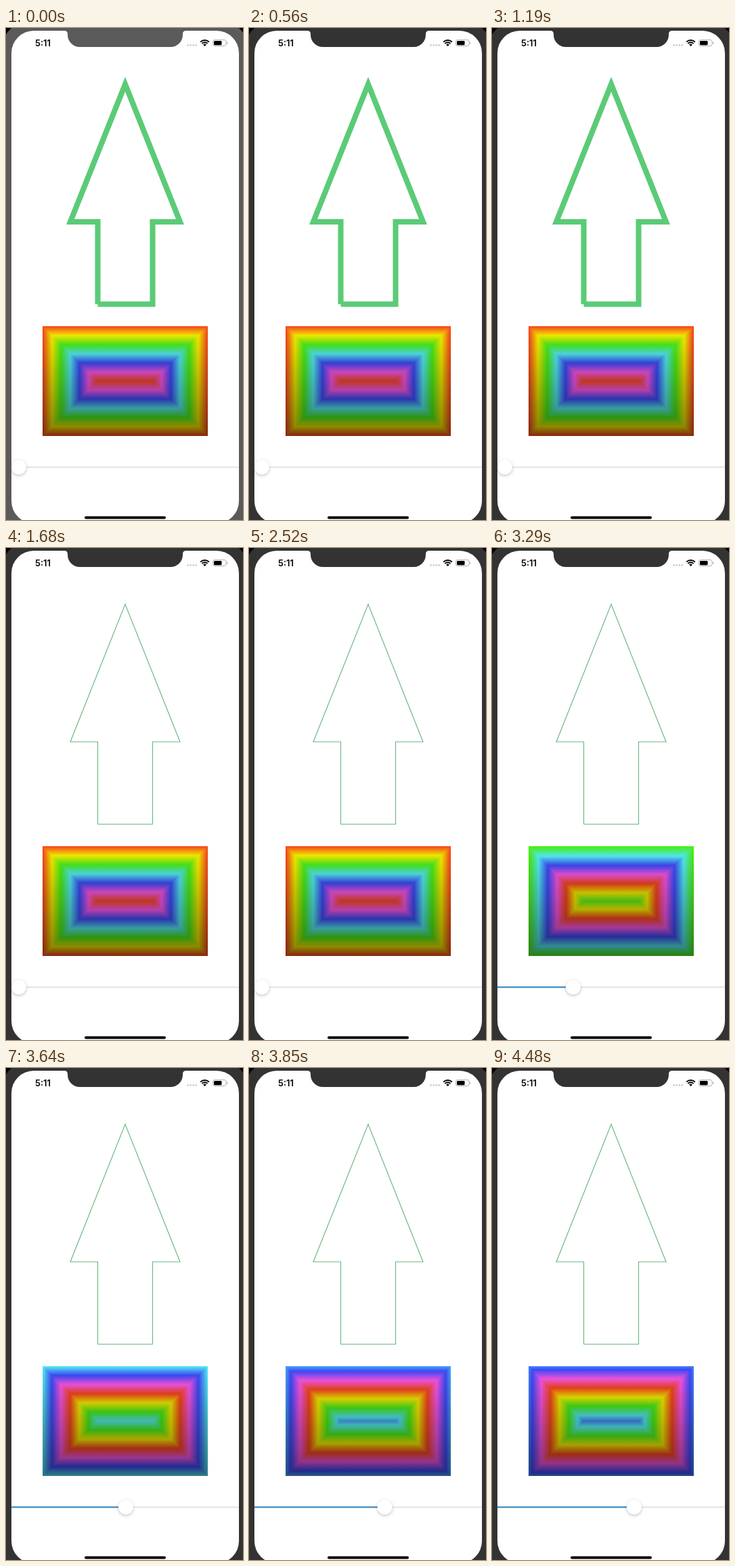
Recreate the animation shown at these times as an HTML page with a canvas. Size 350 px wide and 726 px high, loop 4550 ms.

```html
<!DOCTYPE html>
<html lang="en">
<head>
<meta charset="utf-8">
<title>Arrow and colour cycling rectangle</title>
<style>
html, body { margin: 0; width: 100%; height: 100%; overflow: hidden; background: #333; }
canvas { display: block; width: 350px; height: 726px; }
</style>
</head>
<body>
<canvas id="stage"></canvas>
<script>
const W = 350, H = 726, LOOP = 4550, STEP = 70;
const PT = 336 / 414; // pixels per point of the phone screen
const canvas = document.getElementById('stage');
const ctx = canvas.getContext('2d');
const dpr = window.devicePixelRatio || 1;
canvas.width = W * dpr;
canvas.height = H * dpr;
ctx.scale(dpr, dpr);

const clamp = x => Math.max(0, Math.min(1, x));
const lerp = (a, b, p) => a + (b - a) * p;
const smooth = p => p * p * (3 - 2 * p);
const progress = (t, from, to) => clamp((t - from) / (to - from));
const mix = (a, b, p) => `rgb(${a.map((v, i) => Math.round(lerp(v, b[i], p))).join()})`;

function box(x, y, w, h, radii, fill) {
  ctx.beginPath();
  ctx.roundRect(x, y, w, h, radii);
  ctx.fillStyle = fill;
  ctx.fill();
}

function disc(x, y, r, fill) {
  ctx.beginPath();
  ctx.arc(x, y, r, 0, Math.PI * 2);
  ctx.fillStyle = fill;
  ctx.fill();
}

// Drag of the slider knob: time, x, speed in px per ms
const DRAG = [
  [2590, 19, 0], [3010, 69, 0.165], [3290, 120, 0.178],
  [3640, 177, 0.135], [4060, 210, 0]
];

function knobX(t) {
  if (t <= DRAG[0][0]) return DRAG[0][1];
  for (let i = 1; i < DRAG.length; i++) {
    const [t0, x0, v0] = DRAG[i - 1], [t1, x1, v1] = DRAG[i];
    if (t > t1) continue;
    const d = t1 - t0, p = (t - t0) / d, q = 1 - p;
    return lerp(x0, x1, smooth(p)) + d * p * q * (v0 * q - v1 * p);
  }
  return DRAG[DRAG.length - 1][1];
}

// Hue wheel as the display shows it: red, yellow, green, cyan, blue, magenta
const WHEEL = [
  [248, 70, 28], [248, 240, 0], [72, 240, 24],
  [84, 238, 246], [60, 74, 250], [250, 86, 232]
];

function hue(h) {
  const s = (h % 1) * 6, i = Math.floor(s);
  return mix(WHEEL[i], WHEEL[(i + 1) % 6], s - i);
}

function drawPhone(t) {
  const bezel = mix([90, 90, 90], [51, 51, 51], progress(t, 0, 210));
  ctx.fillStyle = '#000';
  ctx.fillRect(0, 0, W, H);
  box(-8, -12, 368, 800, 48, bezel);
  box(8, 4, 336, 727, 33, '#fff');

  // notch with flared shoulders
  ctx.beginPath();
  ctx.moveTo(86, 3);
  ctx.lineTo(86, 4);
  ctx.quadraticCurveTo(91, 4, 91, 9);
  ctx.arcTo(91, 28, 110, 28, 18);
  ctx.arcTo(261, 28, 261, 9, 18);
  ctx.lineTo(261, 9);
  ctx.quadraticCurveTo(261, 4, 266, 4);
  ctx.lineTo(266, 3);
  ctx.fillStyle = bezel;
  ctx.fill();
}

function drawStatus() {
  ctx.fillStyle = '#000';
  ctx.font = '600 13px Inter, Roboto, sans-serif';
  ctx.textAlign = 'center';
  ctx.textBaseline = 'alphabetic';
  ctx.fillText('5:11', 54.5, 27);

  for (let i = 0; i < 4; i++) disc(268.7 + i * 4, 25.4, 1.4, '#ccc');

  ctx.strokeStyle = '#000';
  ctx.lineWidth = 2;
  for (const r of [9, 5.8]) {
    ctx.beginPath();
    ctx.arc(293.5, 27, r, -Math.PI * 0.75, -Math.PI * 0.25);
    ctx.stroke();
  }
  ctx.beginPath();
  ctx.moveTo(293.5, 27);
  ctx.arc(293.5, 27, 3.4, -Math.PI * 0.75, -Math.PI * 0.25);
  ctx.fillStyle = '#000';
  ctx.fill();

  ctx.beginPath();
  ctx.roundRect(305.5, 17.5, 19.5, 9, 2.6);
  ctx.strokeStyle = '#aaa';
  ctx.lineWidth = 0.9;
  ctx.stroke();
  box(307, 19, 11.5, 6.2, 1.2, '#000');
  box(326, 20.4, 1.1, 3.2, 0.5, '#aaa');
}

function drawArrow(t) {
  const thin = smooth(progress(t, 1260, 1610));
  ctx.beginPath();
  ctx.moveTo(135.5, 407.5);
  for (const [x, y] of [[135.5, 286], [95, 286], [176, 83], [257, 286], [216.5, 286], [216.5, 407.5], [135.5, 407.5]]) {
    ctx.lineTo(x, y);
  }
  ctx.strokeStyle = mix([91, 203, 119], [104, 184, 130], thin);
  ctx.lineWidth = lerp(10 * PT, 1.15, thin);
  ctx.lineJoin = 'miter';
  ctx.stroke();
}

function drawRings(amount) {
  const x = 54, y = 440, w = 244, h = 162;
  for (let i = 0; i < 100; i++) {
    const d = i * PT;
    ctx.fillStyle = hue(i / 100 + amount);
    ctx.fillRect(x + d, y + d, w - 2 * d, h - 2 * d);
  }
  const shade = ctx.createLinearGradient(0, y, 0, y + h);
  shade.addColorStop(0, 'rgba(0,0,0,0)');
  shade.addColorStop(1, 'rgba(0,0,0,0.46)');
  ctx.fillStyle = shade;
  ctx.fillRect(x, y, w, h);
}

function drawSlider(x) {
  const y = 648;
  ctx.fillStyle = '#e6e6e6';
  ctx.fillRect(8, y - 1, 336, 2);
  ctx.fillStyle = '#4993c6';
  ctx.fillRect(8, y - 1.2, x - 8, 2.4);

  ctx.save();
  ctx.beginPath();
  ctx.rect(8, 600, 336, 110);
  ctx.clip();
  ctx.shadowColor = 'rgba(0,0,0,0.24)';
  ctx.shadowBlur = 4 * dpr;
  ctx.shadowOffsetY = 1.5 * dpr;
  disc(x, y, 11, '#fff');
  ctx.restore();
}

function draw(now) {
  const t = Math.floor((now % LOOP) / STEP) * STEP;
  const x = knobX(t);
  drawPhone(t);
  drawStatus();
  drawArrow(t);
  drawRings((x - 19) / 314);
  drawSlider(x);
  box(116, 720.4, 120, 4, 2, '#000');
}

let start;
function tick(now) {
  if (start === undefined) start = now;
  draw(Math.max(0, now - start));
  requestAnimationFrame(tick);
}
draw(0);
requestAnimationFrame(tick);
</script>
</body>
</html>
```
